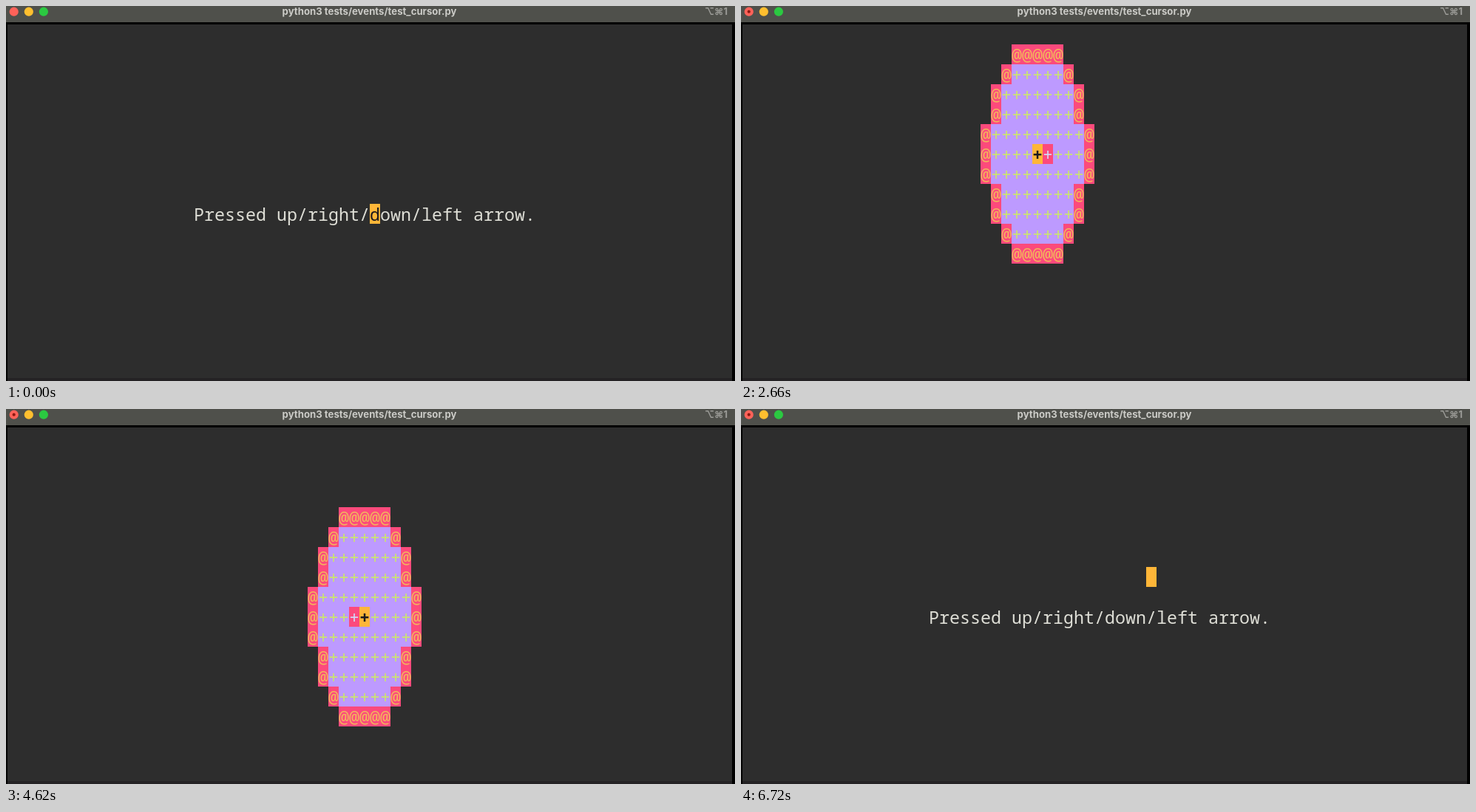
An HTML page with a canvas for the animation above (6790 ms loop, 986 by 508 pixels).

```html
<!DOCTYPE html>
<html lang="en">
<head>
<meta charset="utf-8">
<title>Terminal cursor</title>
<style>
  html, body { margin: 0; width: 100%; height: 100%; overflow: hidden; background: #000; }
  canvas { display: block; }
</style>
</head>
<body>
<canvas id="stage" width="986" height="508"></canvas>
<script>
const ctx = document.getElementById('stage').getContext('2d');

const LOOP = 6790, TICK = 70;
const CELL_W = 14, CELL_H = 27, LEFT = 2, TOP = 25;
const MONO = '23.33px "Noto Sans Mono", "DejaVu Sans Mono", monospace';
const MESSAGE = 'Pressed up/right/down/left arrow.';
const MESSAGE_COL = 18, MESSAGE_ROW = 9;
const DOT_ON = 210, SHAPE_ON = 560, SHAPE_OFF = 6370;
const HALF_WIDTHS = [5, 5, 4, 4, 3, 2]; // by distance from the centre row

const COLOR = {
  bar: '#4f504b', back: '#2d2d2d', text: '#deded6', cursor: '#ffb638', ink: '#1c1a1e',
  edge: '#fc4a7c', edgeText: '#f2b65c', fill: '#bd9aff', fillText: '#cbe56e', trailText: '#d3d8f8'
};

// Key presses: dx, dy, first press, interval, count
const RUNS = [
  [0, -1, SHAPE_ON, 0, 1],
  [0, -1, 1400, 140, 2],
  [-1, 0, 1820, 140, 8],
  [0, 1, 3080, 175, 3],
  [1, 0, 3790, 126, 12],
  [0, -1, 5540, 200, 2]
];

function cursorAt(t) {
  let col = 35, row = 9, last = null;
  for (const [dx, dy, start, gap, count] of RUNS) {
    for (let i = 0; i < count && t >= start + i * gap; i++) {
      last = { col, row };
      col += dx;
      row += dy;
    }
  }
  return { col, row, last };
}

function cell(col, row, char, back, color, weight = 300) {
  const x = LEFT + col * CELL_W, y = TOP + row * CELL_H;
  if (back) {
    ctx.fillStyle = back;
    ctx.fillRect(x, y, CELL_W, CELL_H);
  }
  ctx.font = `${weight} ${MONO}`;
  ctx.textAlign = 'center';
  ctx.fillStyle = color;
  ctx.fillText(char, x + CELL_W / 2, y + 22.5);
}

function disc(x, r, color) {
  ctx.fillStyle = color;
  ctx.beginPath();
  ctx.arc(x, 7.7, r, 0, Math.PI * 2);
  ctx.fill();
}

function drawWindow(t) {
  ctx.fillStyle = '#000';
  ctx.fillRect(0, 0, 986, 508);
  ctx.fillStyle = COLOR.bar;
  ctx.fillRect(0, 0, 986, 22);
  ctx.fillStyle = COLOR.back;
  ctx.fillRect(2, 25, 980, 479);
  ctx.fillStyle = '#242224';
  ctx.fillRect(2, 504, 980, 4);

  disc(10.7, 6.1, '#ff6259');
  disc(30.8, 6.1, '#ffbf2f');
  disc(50.9, 6.1, '#2bc941');
  if (t >= DOT_ON) disc(10.7, 2.1, '#8c1a12');

  ctx.textAlign = 'center';
  ctx.fillStyle = '#cbcbc7';
  ctx.font = '700 13.2px Inter, sans-serif';
  ctx.fillText('python3 tests/events/test_cursor.py', 491.5, 12);
  ctx.textAlign = 'right';
  ctx.fillStyle = '#9c9c98';
  ctx.font = '700 12.8px Inter, "DejaVu Sans", sans-serif';
  ctx.fillText('⌥⌘1', 976, 12);
}

function drawShape({ col, row, last }) {
  for (let dy = -5; dy <= 5; dy++) {
    const half = HALF_WIDTHS[Math.abs(dy)];
    for (let dx = -half; dx <= half; dx++) {
      const edge = Math.abs(dx) === half || Math.abs(dy) === 5;
      if (edge) cell(col + dx, row + dy, '@', COLOR.edge, COLOR.edgeText);
      else cell(col + dx, row + dy, '+', COLOR.fill, COLOR.fillText, 400);
    }
  }
  cell(last.col, last.row, '+', COLOR.edge, COLOR.trailText, 400);
  cell(col, row, '+', COLOR.cursor, COLOR.ink, 600);
}

function drawMessage({ col, row }) {
  [...MESSAGE].forEach((char, i) => cell(MESSAGE_COL + i, MESSAGE_ROW, char, null, COLOR.text));
  const under = row === MESSAGE_ROW ? MESSAGE[col - MESSAGE_COL] : ' ';
  cell(col, row, under, COLOR.cursor, COLOR.ink, 400);
}

function frame() {
  const t = Math.floor(performance.now() % LOOP / TICK) * TICK;
  const cursor = cursorAt(t);
  drawWindow(t);
  if (t >= SHAPE_ON && t < SHAPE_OFF) drawShape(cursor);
  else drawMessage(cursor);
  requestAnimationFrame(frame);
}
frame();
</script>
</body>
</html>
```
